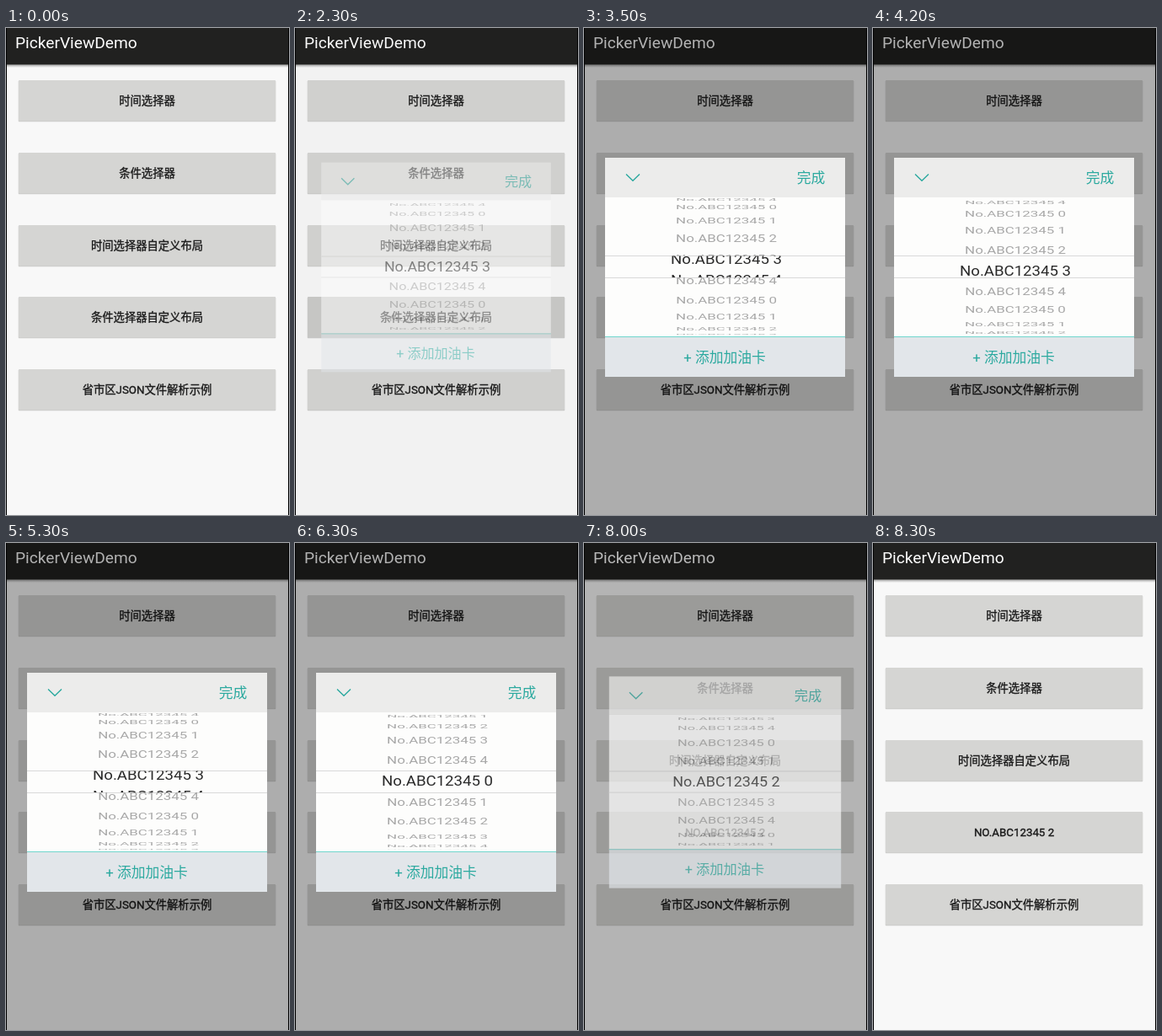
An HTML page that plays this animation: 336x578 px, repeating every 8500 ms.

```html
<!DOCTYPE html>
<html lang="zh">
<head>
<meta charset="utf-8">
<style>
  html, body { margin: 0; width: 100%; height: 100%; overflow: hidden; background: #000; }
  svg { display: block; width: 336px; height: 578px; }
  text { font-family: Roboto, "Noto Sans CJK SC", "Noto Sans CJK", sans-serif; text-anchor: middle; white-space: pre; }
  .button { font-size: 13.3px; fill: #1a1a1a; stroke: #1a1a1a; stroke-width: .35px; }
  .teal { font-size: 16.8px; fill: #2ba99f; }
  .wheel { font-size: 16.9px; }
</style>
</head>
<body>
<svg id="stage" viewBox="0 0 336 578">
  <defs>
    <linearGradient id="shade" x2="0" y2="1">
      <stop stop-color="#000" stop-opacity=".38"/>
      <stop offset="1" stop-color="#000" stop-opacity="0"/>
    </linearGradient>
    <clipPath id="band"><rect x="25" y="270.5" width="285" height="25.5"/></clipPath>
    <clipPath id="rest"><path d="M25 202H310V270.5H25ZM25 296H310V365H25Z"/></clipPath>
  </defs>
  <rect width="336" height="578" fill="#f8f8f8"/>
  <rect y="43" width="336" height="4" fill="url(#shade)"/>
  <rect width="336" height="43.4" fill="#212120"/>
  <text x="11" y="24" style="text-anchor:start" font-size="19.15" fill="#fff">PickerViewDemo</text>
  <g id="buttons"></g>
  <rect id="dim" width="336" height="578" opacity="0"/>
  <path d="M.5 0V578M335.5 0V578" stroke="#000"/>
  <g id="panel">
    <rect x="25" y="154" width="285" height="47" fill="#ececeb"/>
    <rect x="25" y="201" width="285" height="165" fill="#fdfdfc"/>
    <rect x="25" y="366" width="285" height="48" fill="#e2e6ea"/>
    <rect x="25" y="366" width="285" height="1" fill="#70d6cd"/>
    <path d="M50 173.5L58 181.3L66 173.5" fill="none" stroke="#2ba99f" stroke-width="1.4"/>
    <text class="teal" x="269.5" y="184">完成</text>
    <text class="teal" x="167" y="396.5">+ 添加加油卡</text>
    <path d="M25 270.5H310M25 296.5H310" stroke="#d9d9d9"/>
    <g id="outer" class="wheel" clip-path="url(#rest)" fill="#a8a8a8"></g>
    <g id="inner" class="wheel" clip-path="url(#band)" fill="#2a2a2a"></g>
  </g>
</svg>
<script>
const LOOP = 8500, STEP = 100;
const MID = 283, RADIUS = 81, ITEMS = 5, REACH = 5;
const DECEL = 24.5; // items per second squared
const LABELS = ['时间选择器', '条件选择器', '时间选择器自定义布局', '条件选择器自定义布局', '省市区JSON文件解析示例'];

const $ = id => document.getElementById(id);
const ramp = (t, start, length) => Math.min(1, Math.max(0, (t - start) / length));
const easeOut = u => 1 - (1 - u) ** 2;

function add(parent, tag, attrs, label = '') {
  const node = document.createElementNS('http://www.w3.org/2000/svg', tag);
  for (const key in attrs) node.setAttribute(key, attrs[key]);
  node.textContent = label;
  return parent.appendChild(node);
}

const buttons = LABELS.map((label, i) => {
  const y = 62 + Math.round(i * 85.75);
  add($('buttons'), 'rect', { x: 14.7, y: y + .5, width: 305.6, height: 48.7, rx: 1, fill: '#cacac9' });
  const face = add($('buttons'), 'rect', { x: 15, y, width: 305, height: 48.2, rx: 1, fill: '#d5d5d3' });
  const text = add($('buttons'), 'text', { class: 'button', x: 167.5, y: y + 29 }, label);
  return { face, text };
});

const makeRows = id => Array.from({ length: 2 * REACH + 1 }, () => add($(id), 'text', { y: 6 }));
const outerRows = makeRows('outer'), innerRows = makeRows('inner');

// Distance covered by a decelerating fling that would last one second.
function fling(t, start, length = 1000) {
  const s = ramp(t, start, length) * length / 1000;
  return DECEL * (s - s * s / 2);
}

function wheelPosition(t) {
  const first = 3.04 * ramp(t, 3150, 250) ** 1.5 + fling(t, 3400) - .29 * easeOut(ramp(t, 4400, 200));
  const second = 3 * ramp(t, 4950, 250) ** 1.5 + fling(t, 5200, 400)
    + .91 * ramp(t, 5600, 100) + fling(t, 5700);
  return t < 6900 ? 3 + first + second : 42;
}

function drawWheel(pos) {
  const nearest = Math.round(pos);
  for (let k = 0; k <= 2 * REACH; k++) {
    const item = nearest + k - REACH;
    const angle = (item - pos) * Math.PI / 10;
    const squash = Math.max(0, Math.cos(angle));
    const y = MID + RADIUS * Math.sin(angle);
    const label = 'No.ABC12345 ' + (item % ITEMS + ITEMS) % ITEMS;
    const place = (row, sx, sy) => {
      row.textContent = label;
      row.setAttribute('transform', `translate(169 ${y}) scale(${sx} ${sy * squash})`);
    };
    place(outerRows[k], 1, .8);
    place(innerRows[k], 1.1, 1);
  }
}

function draw(t) {
  const closing = t >= 7950;
  const alpha = closing ? 1 - ramp(t, 7950, 150) : ramp(t, 2225, 150);
  const grow = closing ? 1 - easeOut(ramp(t, 7950, 270)) : easeOut(ramp(t, 2225, 220));
  const scale = .9 + .1 * grow;
  $('panel').setAttribute('opacity', alpha);
  $('panel').setAttribute('transform', `translate(167.5 284) scale(${scale}) translate(-167.5 -284)`);
  $('dim').setAttribute('opacity', .3 * (ramp(t, 2280, 240) - ramp(t, 7980, 240)));

  const pressed = t >= 2200 && t < 2500;
  buttons[3].face.setAttribute('fill', pressed ? '#cbcbc9' : '#d5d5d3');
  const chosen = t >= 8000;
  buttons[3].text.textContent = chosen ? 'NO.ABC12345 2' : LABELS[3];
  drawWheel(wheelPosition(t));
}

const origin = performance.now();
function tick() {
  const t = (performance.now() - origin) % LOOP;
  draw(Math.floor(t / STEP) * STEP);
  requestAnimationFrame(tick);
}
tick();
</script>
</body>
</html>
```
